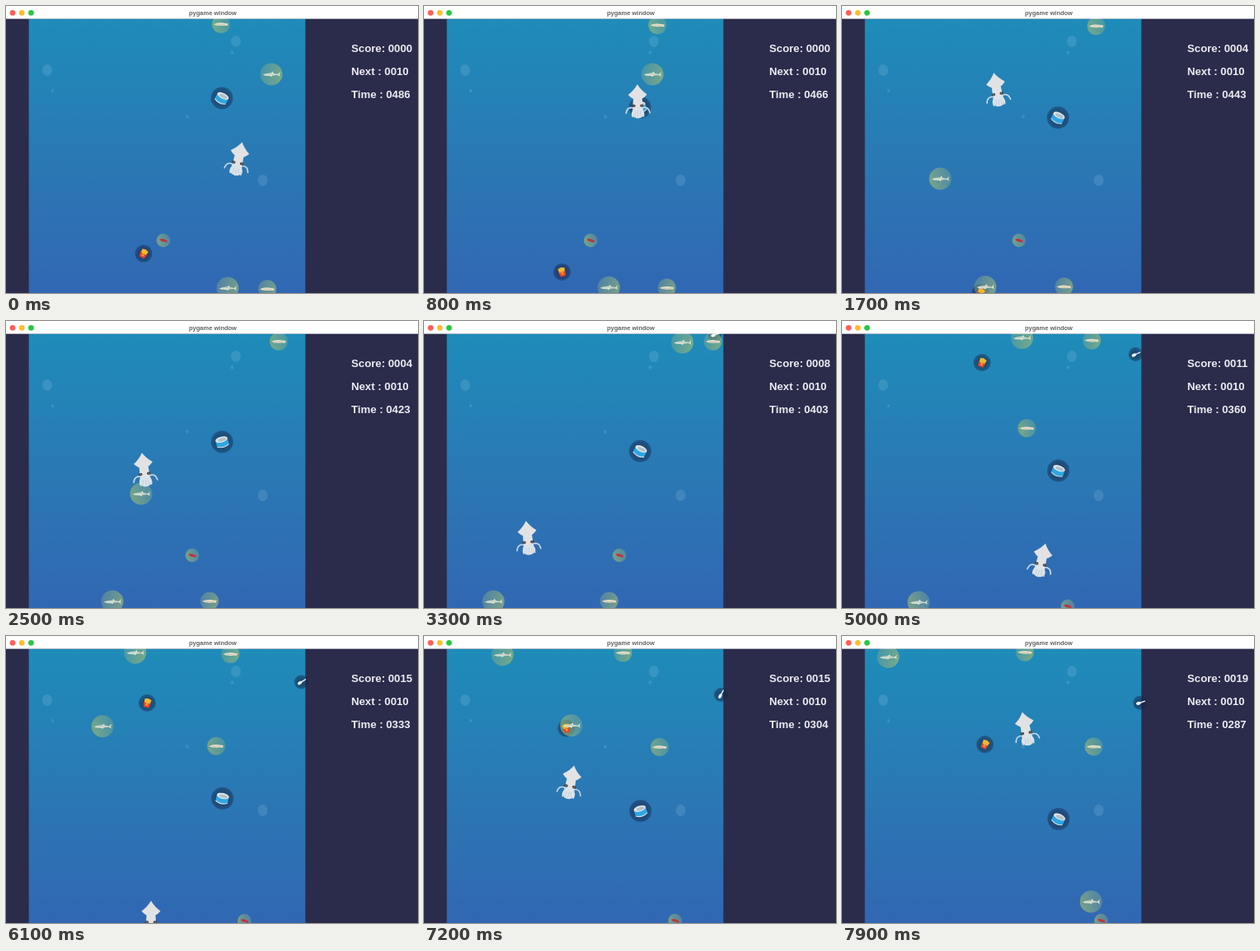
Recreate the animation shown at these times as an HTML page with a canvas. Size 500x349 px, loop 8 s.

```html
<!DOCTYPE html>
<html lang="en">
<head>
<meta charset="utf-8">
<title>pygame window</title>
<style>
  html, body { margin: 0; width: 100%; height: 100%; overflow: hidden; background: #2b2c4b; }
  canvas, svg { position: absolute; left: 0; top: 0; width: 500px; height: 349px; display: block; }
  text { font-family: "Liberation Sans", Arial, sans-serif; font-weight: bold; white-space: pre; }
  .hud { font-size: 13.2px; fill: #ebebf0; }
  .title { font-size: 7.5px; fill: #626262; text-anchor: middle; }
</style>
</head>
<body>
<canvas id="stage" width="500" height="349"></canvas>
<svg viewBox="0 0 500 349">
  <text class="title" x="251" y="10.8">pygame window</text>
  <text class="hud" id="score" x="419" y="56.3"></text>
  <text class="hud" x="419" y="84.3">Next : 0010</text>
  <text class="hud" id="time" x="419" y="112.3"></text>
</svg>
<script>
const LOOP = 8000, STEP = 100, BAR = 15.6;
const LEFT = 41, RIGHT = 352;
const ctx = document.getElementById('stage').getContext('2d');
const scoreText = document.getElementById('score');
const timeText = document.getElementById('time');

// Speeds are pixels per second: fish swim sideways, trash sinks.
const kinds = {
  can:      { r: 13.5, speed: 14, trash: true },
  fries:    { r: 10.5, speed: 28, trash: true },
  spoon:    { r: 8.5,  speed: 14, trash: true },
  mackerel: { r: 13.5, speed: 56, points: 4 },
  sardine:  { r: 11,   speed: 28, points: 2 },
  shrimp:   { r: 8.3,  speed: 14, points: 1 }
};

const sink = (kind, born, x, y, drift) => ({ kind, born, eaten: Infinity, x, y, drift });
const swim = (kind, born, eaten, x, y, dir, sway = 0) => ({ kind, born, eaten, x, y, dir, sway });

// An eaten fish comes back elsewhere at the same moment.
const swimmers = [
  sink('can', 0, 262, 112, 0.1),
  sink('fries', 0, 167, 301, 0.6),
  sink('fries', 3300, 168, 3, 1.2),
  sink('spoon', 2100, 350.7, 0, 1.9),
  swim('sardine', 0, Infinity, 261, 22, 1, 2.8),
  swim('sardine', 0, 4200, 317, 344, -1, -3.5),
  swim('sardine', 4200, Infinity, 202, 127, 1, 8),
  swim('mackerel', 0, 1000, 322, 83, -1),
  swim('mackerel', 1000, 2650, 80, 210, 1),
  swim('mackerel', 2650, Infinity, 350, 29, -1, -9),
  swim('mackerel', 0, 5900, 269, 343, -1, -2),
  swim('mackerel', 5900, 7700, 106, 110, 1, -2),
  swim('mackerel', 7700, Infinity, 291, 323, 1),
  swim('shrimp', 0, 4650, 191, 285, 1),
  swim('shrimp', 4650, Infinity, 269, 347, 1, -1)
];

// time, x, y, tilt in degrees
const squidPath = [
  [0, 282, 187, 12], [1000, 250, 105, -4], [1700, 188, 103, -10], [2650, 163, 198, -7],
  [3300, 126, 265, -6], [4250, 192, 320, 8], [5000, 242, 292, 13], [6100, 176, 344, 0],
  [7200, 178, 179, 11], [7900, 223, 114, -11]
];
const countdown = [[0, 486], [6100, 332.55], [7900, 286.6]];

// Smooth curve through timed keys; with two columns a straight line.
function follow(keys, t, smooth) {
  let i = 0;
  while (i < keys.length - 2 && t >= keys[i + 1][0]) i++;
  const a = keys[i], b = keys[i + 1], span = b[0] - a[0];
  const u = Math.min(1, (t - a[0]) / span), v = 1 - u;
  if (!smooth) return a.slice(1).map((p, k) => p * v + b[k + 1] * u);
  const slope = (n, k) => {
    const p = keys[Math.max(0, n - 1)], q = keys[Math.min(keys.length - 1, n + 1)];
    return (q[k] - p[k]) / (q[0] - p[0]);
  };
  return [1, 2, 3].map(k =>
    v * v * (1 + 2 * u) * a[k] + u * u * (3 - 2 * u) * b[k] +
    span * u * v * (v * slope(i, k) - u * slope(i + 1, k)));
}

function locate(s, t) {
  const age = (t - s.born) / 1000, { speed, trash } = kinds[s.kind];
  if (trash) {
    const tilt = 5 + 22 * Math.cos(2 * Math.PI * t / 1600);
    return { x: s.x + s.drift * age, y: s.y + speed * age, tilt, dir: 1 };
  }
  let x = s.x + s.dir * speed * age, dir = s.dir;
  if (x > RIGHT) { x = 2 * RIGHT - x; dir = -1; }
  if (x < LEFT) { x = 2 * LEFT - x; dir = 1; }
  return { x, y: s.y + s.sway * Math.sin(2 * Math.PI * age / 12), tilt: 0, dir };
}

function oval(x, y, rx, ry, fill) {
  ctx.beginPath();
  ctx.ellipse(x, y, rx, ry, 0, 0, 7);
  ctx.fillStyle = fill;
  ctx.fill();
}

function shape(d, fill) {
  ctx.fillStyle = fill;
  ctx.fill(new Path2D(d));
}

function line(d, color, width) {
  ctx.strokeStyle = color;
  ctx.lineWidth = width;
  ctx.lineCap = 'round';
  ctx.stroke(new Path2D(d));
}

function placed(x, y, deg, draw) {
  ctx.save();
  ctx.translate(x, y);
  ctx.rotate(deg * Math.PI / 180);
  draw();
  ctx.restore();
}

const art = {
  can() {
    shape('M-7.5-3V4Q0 9 7.5 4V-3Z', '#2fa6e2');
    line('M-7 4.6Q0 8.6 7 4.6', '#d3e3ec', 1.1);
    oval(0, -3, 7.5, 3.5, '#dfe5e8');
    oval(0.6, -2.7, 5.2, 2, '#b3bfc8');
  },
  fries() {
    shape('M-4-4.5L0-5.6L4.4-4.2L3.4 1H-3.4Z', '#f5b52c');
    shape('M-4.4-.8Q0 2 4.4-.8L3.2 5.4H-3.2Z', '#e2472b');
    oval(0, 2, 1.6, 1.5, '#f0982e');
  },
  spoon() {
    placed(0, 0, -45, () => {
      line('M0 0H6', '#dfe6ec', 1.5);
      oval(-2, 0, 2.9, 1.9, '#eef1f4');
    });
  },
  sardine() {
    shape('M-9 .2Q-4-2.2 2-1.5L8.5-.6L8 2L4 1.8Q-4 2.8-9 .2Z', '#e3dfc8');
    line('M-5 .8Q0 .2 5 .9', '#c6b99f', 0.7);
  },
  mackerel() {
    shape('M-10.5 .5Q-5-1.6 0-1.4L1.5-3.4L2.8-1L8 0L10.8-3L10 .4L10.8 2.8L7.5 1L1.5 1.5L0 3.2L-1.5 2Q-7 2.4-10.5 .5Z', '#d9e2d3');
    line('M-6 .1Q0-.8 6 .2', '#a6bbb0', 0.6);
  },
  shrimp() {
    shape('M-4.5-1.6Q0-3 3-.5L5 1L4 2.6L1.5 1.7Q-3 1.6-4.5-1.6Z', '#c4303c');
  }
};

// Fish bubbles are brighter on the trailing side.
function bubble({ r, trash }, dir) {
  const g = trash
    ? ctx.createRadialGradient(0, 0, r * 0.4, 0, 0, r)
    : ctx.createLinearGradient(-r * dir, r * 0.3, r * dir, -r * 0.3);
  const [near, far] = trash
    ? ['rgba(20,36,70,.62)', 'rgba(20,36,70,.42)']
    : ['rgba(150,182,118,.72)', 'rgba(130,172,140,.4)'];
  g.addColorStop(0, near);
  g.addColorStop(1, far);
  oval(0, 0, r, r, g);
}

function squid(t) {
  const [x, y, tilt] = follow(squidPath, t, true);
  placed(x, y, tilt, () => {
    for (const side of [-1, 1]) {
      ctx.save();
      ctx.scale(side, 1);
      line('M4 7Q13 4 14.5 13', '#c9d8e6', 1.6);
      line('M3 8Q8 11 6.5 17', '#d9e1e9', 2);
      ctx.restore();
    }
    shape('M-5.5 5Q-8 14-5 18Q0 21 5 18Q8 14 5.5 5Z', '#dce3e9');
    line('M-3 11L-3.5 17M0 11V18M3 11L3.5 17', '#b5c7d5', 0.6);
    shape('M0-22Q4-15 11.5-9.5Q8-5.5 5.5-4.5L6 5Q0 10-6 5L-5.5-4.5Q-8-5.5-11.5-9.5Q-4-15 0-22Z', '#e2e2e4');
    for (const side of [-5, 5]) {
      oval(side, 4, 2.3, 1.7, '#3f4043');
      oval(side, 4, 0.7, 0.7, '#a99c78');
    }
  });
}

function backdrop() {
  ctx.fillStyle = '#2b2c4b';
  ctx.fillRect(0, 0, 500, 349);
  const sea = ctx.createLinearGradient(0, BAR, 0, 349);
  sea.addColorStop(0, '#1e8cb9');
  sea.addColorStop(0.55, '#2b77b4');
  sea.addColorStop(1, '#3167b3');
  ctx.fillStyle = sea;
  ctx.fillRect(27.7, BAR, 335.6, 349);
  for (const [x, y, r] of [[50, 78, 6], [56.5, 103, 1.8], [279, 43, 6], [274.5, 56.5, 2], [220, 134.5, 2], [311.5, 212, 6]])
    oval(x, y, r, r * 1.15, 'rgba(170,215,235,.17)');
}

function titleBar() {
  ctx.fillStyle = '#fff';
  ctx.fillRect(0, 0, 500, BAR);
  ['#fe5f57', '#febc2e', '#28c840'].forEach((c, i) => oval(8 + i * 11.2, 8.3, 3.4, 3.4, c));
}

const pad = n => String(Math.round(n)).padStart(4, '0');

function render(t) {
  backdrop();
  const alive = swimmers
    .filter(s => t >= s.born && t < s.eaten)
    .map(s => ({ kind: s.kind, ...locate(s, t) }));
  for (const s of alive) placed(s.x, s.y, 0, () => bubble(kinds[s.kind], s.dir));
  for (const s of alive) placed(s.x, s.y, s.tilt, art[s.kind]);
  squid(t);
  titleBar();
  const score = swimmers.reduce((sum, s) => sum + (t >= s.eaten ? kinds[s.kind].points : 0), 0);
  scoreText.textContent = 'Score: ' + pad(score);
  timeText.textContent = 'Time : ' + pad(follow(countdown, t)[0]);
}

const start = performance.now();
function tick() {
  const t = (performance.now() - start) % LOOP;
  render(Math.floor(t / STEP) * STEP);
  requestAnimationFrame(tick);
}
tick();
</script>
</body>
</html>
```
